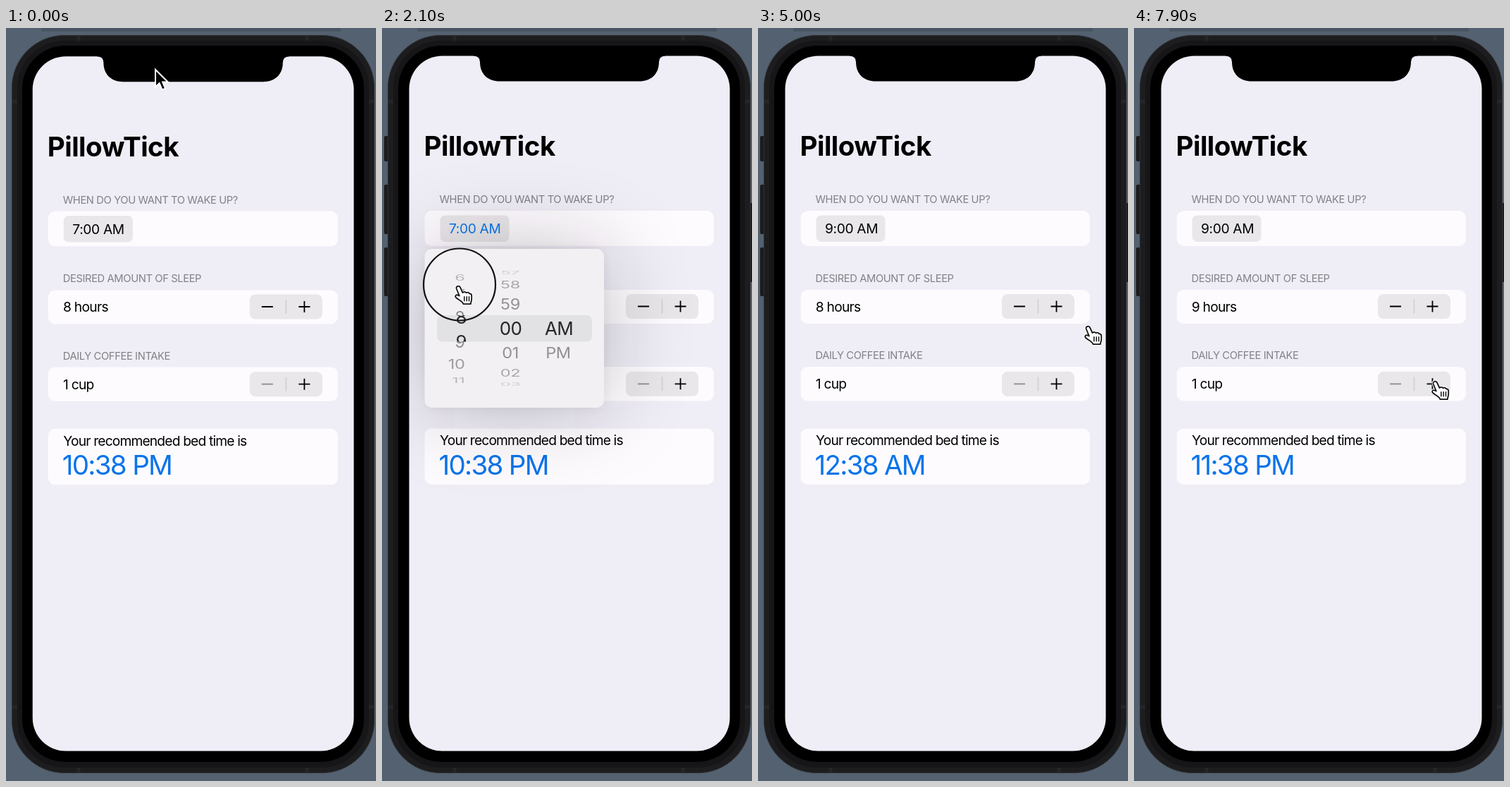
These frames come from a looping animation (525 px wide and 1067 px high, 8 s). An HTML page:

```html
<!DOCTYPE html>
<html lang="en">
<head>
<meta charset="utf-8">
<title>Bed time planner</title>
<style>
  html, body { margin: 0; width: 100%; height: 100%; overflow: hidden; background: #536170; }
  svg { display: block; width: 100%; height: 100%; }
  text { font-family: Inter, "Liberation Sans", sans-serif; font-optical-sizing: none; font-size: 19.2px; letter-spacing: -.72px; }
  .title { font-size: 38.5px; font-weight: 700; letter-spacing: -.5px; }
  .head { font-size: 14.7px; letter-spacing: -.38px; fill: #828086; }
  .chip { letter-spacing: -.35px; }
  .lead { letter-spacing: -.83px; }
  .big { font-size: 38.5px; letter-spacing: -1.7px; fill: #0a74ea; }
  .row { font-size: 23.6px; letter-spacing: -.4px; }
  .mid { font-size: 26px; letter-spacing: -.6px; fill: #27262a; }
  .card { fill: #fdfbfe; }
  .soft { fill: #e9e7ea; }
</style>
</head>
<body>
<svg viewBox="0 0 525 1067" preserveAspectRatio="none">
  <defs>
    <clipPath id="screen"><rect x="38.5" y="39.5" width="455" height="985" rx="47"/></clipPath>
    <clipPath id="band"><rect x="78" y="407" width="220" height="37.5"/></clipPath>
    <clipPath id="around"><path d="M60 313H316V407H60ZM60 444.5H316V538H60Z"/></clipPath>
    <clipPath id="open"><rect class="sheet" x="60.5" y="313" width="254.5" height="225" rx="10"/></clipPath>
    <filter id="blur" filterUnits="userSpaceOnUse" x="-200" y="50" width="800" height="760"><feGaussianBlur stdDeviation="62"/></filter>
    <filter id="near" filterUnits="userSpaceOnUse" x="0" y="250" width="400" height="360"><feGaussianBlur stdDeviation="8"/></filter>
  </defs>

  <rect width="525" height="1067" fill="#536170"/>
  <rect x="50" width="425" height="5" fill="#000" opacity=".12"/>
  <g id="keys" fill="#1c1c1e">
    <rect x="3" y="153" width="8" height="36" rx="2"/>
    <rect x="3" y="222" width="8" height="70" rx="2"/>
    <rect x="3" y="311" width="8" height="69" rx="2"/>
    <rect x="518" y="248" width="9" height="112" rx="2"/>
  </g>
  <rect x="8.5" y="10.5" width="514" height="1045" rx="74" fill="#1d1d1f" stroke="#303033"/>
  <path d="M103 11v8M427 11v8M103 1047v8M427 1047v8M9 104h7M9 962h7M515 104h7M515 962h7" stroke="#38383b" stroke-width="5" opacity=".35"/>
  <rect x="16" y="18" width="499" height="1030" rx="67" fill="#161618"/>
  <rect x="23" y="25" width="485" height="1015" rx="61"/>

  <g id="view">
    <g clip-path="url(#screen)">
      <rect x="38" y="39" width="456" height="987" fill="#efedf6"/>
      <text class="title" x="59.5" y="181">PillowTick</text>
      <text class="head" x="81.5" y="248">WHEN DO YOU WANT TO WAKE UP?</text>
      <text class="head" x="81.5" y="359.8">DESIRED AMOUNT OF SLEEP</text>
      <text class="head" x="81.5" y="469.3">DAILY COFFEE INTAKE</text>
      <rect class="card" x="60.5" y="259" width="410.5" height="50" rx="10"/>
      <rect class="card" x="60.5" y="371" width="410.5" height="48" rx="10"/>
      <rect class="card" x="60.5" y="480" width="410.5" height="48.5" rx="10"/>
      <rect class="card" x="60.5" y="567.5" width="410.5" height="79.5" rx="10"/>
      <rect class="soft" x="82.5" y="265.5" width="98" height="37.5" rx="7"/>
      <text class="chip" id="wake" x="95" y="291.3"></text>
      <text id="hours" x="81.7" y="401.8"></text>
      <text x="81.7" y="511.3">1 cup</text>
      <text class="lead" x="82" y="591.3">Your recommended bed time is</text>
      <text class="big" id="bed" x="80.5" y="632.8"></text>
      <g id="steppers" stroke-width="1.8"></g>

      <g id="pop">
        <rect class="sheet" x="60.5" y="313" width="254.5" height="225" rx="10" fill="#1c181c" opacity=".25" filter="url(#blur)"/>
        <rect class="sheet" x="60.5" y="313" width="254.5" height="225" rx="10" opacity=".05" filter="url(#near)"/>
        <rect class="sheet" x="60.5" y="313" width="254.5" height="225" rx="10" fill="#f2f0f3"/>
        <g clip-path="url(#open)">
          <rect x="78" y="407" width="220" height="37.5" rx="8" fill="#e2e1e4"/>
          <g id="outer" clip-path="url(#around)"></g>
          <g id="inner" clip-path="url(#band)"></g>
        </g>
      </g>
    </g>
    <path d="M130 37H402V39.5Q393 40 393 48C393 66 381 75.5 365 75.5H167C151 75.5 139 66 139 48Q139 40 130 39.5Z"/>
  </g>

  <g id="cursor">
    <circle id="ring" cx="1" cy="-1.5" r="51" fill="none" stroke="#111" stroke-width="2.2"/>
    <path id="arrow" d="M0 0V24.5L5.6 19.3 9.6 28.5 14 26.6 10.2 17.6H17.8Z" stroke="#fff" stroke-width="2"/>
    <g id="hand" stroke-linejoin="round" stroke-linecap="round">
      <path id="palm" d="M-3.5 4C-4 .5 .5 -.5 2 2.5L5.5 10C7.5 8.5 9.5 9 10.5 10.2 12.5 9 14.5 9.8 15 11.4 17 11 18.2 12.4 18.2 14.4V19C18.2 22 17 23 16.8 26.2H6.5C5.5 22.5 0 20.5 -4 17 -6 14.8 -4 12.3 -1 13.6L.8 14.5Z" fill="#fff" stroke="#111" stroke-width="1.8"/>
      <path d="M7.8 15.8v6M11.2 15.8v6M14.5 15.8v6" stroke="#111" stroke-width="1.5"/>
    </g>
  </g>
</svg>

<script>
const LOOP = 8000, STEP = 100;
const $ = id => document.getElementById(id);
const NS = 'http://www.w3.org/2000/svg';

function add(parent, tag, attrs, label) {
  const el = document.createElementNS(NS, tag);
  for (const k in attrs) el.setAttribute(k, attrs[k]);
  if (label !== undefined) el.textContent = label;
  parent.appendChild(el);
  return el;
}
const show = (el, on) => { el.style.display = on ? '' : 'none'; };

// Table rows are [time, value...]; values ease from row to row and hold outside the table.
function track(rows, t) {
  const i = rows.findLastIndex(r => r[0] <= t);
  const a = rows[Math.max(i, 0)], b = rows[i + 1];
  if (i < 0 || !b) return a.slice(1);
  const u = (t - a[0]) / (b[0] - a[0]), e = u * u * (3 - 2 * u);
  return a.slice(1).map((v, k) => v + (b[k + 1] - v) * e);
}
const last = (rows, t) => rows.findLast(r => r[0] <= t)[1];
const within = (spans, t) => spans.some(([a, b]) => t >= a && t < b);

const POINTER = [
  [0, 212, 59], [600, 97, 288], [1200, 97, 288], [1800, 108, 416], [1900, 108, 416],
  [2100, 109, 365], [2400, 109, 331], [2600, 109, 331], [3300, 305, 226], [3600, 318, 220],
  [4300, 378, 198], [4400, 380, 182], [4500, 380, 182], [5000, 469, 422], [5200, 469, 422],
  [5400, 428, 403], [7100, 428, 403], [7800, 428, 500]
];
const PRESS = [[700, 800], [1900, 2600], [4400, 4500], [5400, 5500], [5600, 5700], [5800, 5900], [6200, 6300]];
const PLUS_LIT = [[5400, 6000], [6200, 6400]];
// scale, height, opacity
const POPUP = [
  [800, .4, 90, 0], [900, .59, 135, .42], [1000, .83, 190, .76], [1100, .95, 215, .94], [1300, 1, 225, 1],
  [4500, 1, 225, 1], [4700, .72, 165, .4], [4800, .5, 110, 0]
];
const WAKE = [[0, '7:00 AM'], [2900, '9:00 AM']];
const HOURS = [[0, '8 hours'], [5500, '8.25 hours'], [5700, '8.5 hours'], [5900, '8.75 hours'], [6300, '9 hours']];
const BED = [[0, '10:38 PM'], [2900, '12:38 AM'], [5500, '12:23 AM'], [5700, '12:08 AM'], [5900, '11:53 PM'], [6300, '11:38 PM']];

function stepper(cy, minus) {
  const g = $('steppers'), y = cy - 17.5;
  add(g, 'rect', { class: 'soft', x: 346, y, width: 103, height: 35, rx: 8 });
  const line = add(g, 'path', { d: `M397.5 ${cy - 10}v20`, stroke: '#d3d1d5' });
  const lit = add(g, 'rect', { x: 397.5, y, width: 51.5, height: 35, rx: 8, fill: '#bbb9bf' });
  add(g, 'path', { d: `M363 ${cy}h16`, stroke: minus });
  add(g, 'path', { d: `M415.5 ${cy}h16m-8 -8v16`, stroke: '#000' });
  return on => { show(lit, on); show(line, !on); };
}
const lightSleep = stepper(394.5, '#000');
stepper(504.3, '#8b898e')(false);

// Wheel columns: every label is drawn grey on the drum and dark in the band.
const MID = 425.6, RADIUS = 81.7, TURN = 25 * Math.PI / 180;
function column(labels, first, x, midX, anchor) {
  const rows = labels.map((label, i) => ({
    at: first + i,
    far: add($('outer'), 'text', { class: 'row', y: 8.6, 'text-anchor': anchor }, label),
    near: add($('inner'), 'text', { class: 'mid', y: 9.4, 'text-anchor': anchor }, label)
  }));
  return pos => rows.forEach(({ at, far, near }) => {
    const k = at - pos, c = Math.cos(k * TURN), s = Math.sin(k * TURN);
    show(far, Math.abs(k) < 3.4);
    show(near, Math.abs(k) < 1.5);
    far.setAttribute('transform', `translate(${x} ${MID + RADIUS * s}) scale(1 ${c})`);
    far.setAttribute('opacity', .43 * Math.max(c, 0) ** .8);
    near.setAttribute('transform', `translate(${midX} ${MID + RADIUS * s}) scale(1 ${c})`);
  });
}
const range = (a, n) => Array.from({ length: n }, (_, i) => a + i);
const hourWheel = column(range(4, 9), 4, 117.5, 120, 'end');
column(range(57, 7).map(m => String(m % 60).padStart(2, '0')), -3, 182, 182.5, 'middle')(0);
column(['AM', 'PM'], 0, 250, 251, 'middle')(0);

function wheelAt(t, y) {
  if (t < 1900) return 7;
  if (t < 2600) return 7 + (416 - y) / 35;
  return track([[2600, 9.35], [2900, 9]], t)[0];
}

const halo = $('palm').cloneNode();
halo.removeAttribute('id');
halo.setAttribute('stroke', '#fff');
halo.setAttribute('stroke-width', 3.6);
$('hand').prepend(halo);
const sheets = document.querySelectorAll('.sheet');

function draw(t) {
  const active = t >= 200;
  show($('keys'), active);
  // The idle window is drawn a touch wider and lower, pinned at its bottom right.
  $('view').setAttribute('transform', active ? '' : 'translate(493.5 1024.5) scale(1.0018 .9992) translate(-493.5 -1024.5)');

  const [x, y] = track(POINTER, t);
  $('cursor').setAttribute('transform', `translate(${x} ${y})`);
  show($('arrow'), !active);
  show($('hand'), active);
  show($('ring'), within(PRESS, t));

  $('wake').textContent = last(WAKE, t);
  $('wake').setAttribute('fill', t >= 800 && t < 4600 ? (t < 1000 ? '#2a86ea' : '#0a74ea') : '#000');
  $('hours').textContent = last(HOURS, t);
  $('bed').textContent = last(BED, t);
  lightSleep(within(PLUS_LIT, t));

  const [scale, height, opacity] = track(POPUP, t);
  show($('pop'), opacity > 0);
  $('pop').setAttribute('opacity', opacity);
  $('pop').setAttribute('transform', `translate(131.5 313) scale(${scale}) translate(-131.5 -313)`);
  sheets.forEach(el => el.setAttribute('height', height));
  hourWheel(wheelAt(t, y));
}

const start = performance.now();
function tick() {
  const t = Math.max(0, performance.now() - start) % LOOP;
  draw(Math.floor(t / STEP) * STEP);
  requestAnimationFrame(tick);
}
tick();
</script>
</body>
</html>
```
